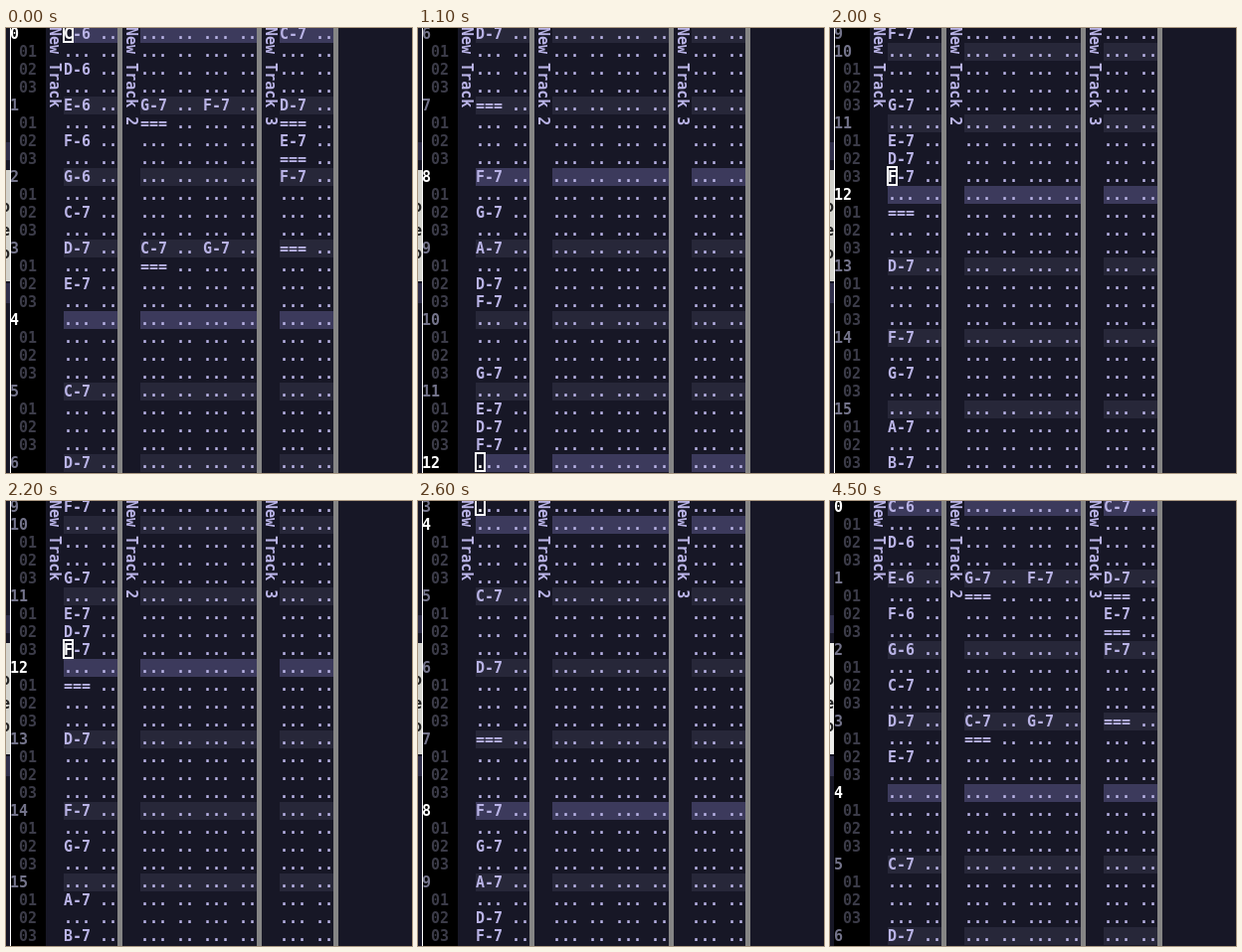
An HTML page with a canvas for the animation above (5000 ms loop, 408 by 448 pixels).

```html
<!DOCTYPE html>
<html lang="en">
<head>
<meta charset="utf-8">
<title>Pattern editor</title>
<style>
  html, body { margin: 0; width: 100%; height: 100%; overflow: hidden; background: #171726; }
  canvas { display: block; }
</style>
</head>
<body>
<canvas id="stage" width="408" height="448"></canvas>
<script>
const ctx = document.getElementById('stage').getContext('2d');
const LOOP = 5000, ROW = 18, CHAR = 9, VISIBLE = 25, LAST = 63;
const FONT = 'bold 15px "DejaVu Sans Mono", monospace';
const BG = '#171726', TEXT = '#b9b3e6';

// "row:note" lists, one per note column
const parse = list => Object.fromEntries(list.split(' ').map(item => item.split(':')));
const tracks = [
  { name: 'New Track', x: 40, columns: [parse(
    '0:C-6 2:D-6 4:E-6 6:F-6 8:G-6 10:C-7 12:D-7 14:E-7 20:C-7 24:D-7 28:=== ' +
    '32:F-7 34:G-7 36:A-7 38:D-7 39:F-7 43:G-7 45:E-7 46:D-7 47:F-7 49:=== ' +
    '52:D-7 56:F-7 58:G-7 61:A-7 63:B-7')] },
  { name: 'New Track 2', x: 117, columns: [
    parse('4:G-7 5:=== 12:C-7 13:==='), parse('4:F-7 12:G-7')] },
  { name: 'New Track 3', x: 257, columns: [
    parse('0:C-7 4:D-7 5:=== 6:E-7 7:=== 8:F-7 12:===')] }
];

// Page Down four times, then Page Up four times
const PAGE = 16;
const keys = [[500, PAGE], [800, PAGE], [1100, PAGE], [1300, PAGE],
              [2000, -PAGE], [2400, -PAGE], [2600, -PAGE], [3000, -PAGE]];

function viewAt(time) {
  let cursor = 0, top = 0;
  for (const [at, step] of keys) {
    if (time < at) break;
    cursor = Math.max(0, Math.min(LAST, cursor + step));
    top = Math.min(cursor, Math.max(top, cursor - VISIBLE + 1));
  }
  return { cursor, top, focused: time < 4500 };
}

function rect(x, y, w, h, color) {
  ctx.fillStyle = color;
  ctx.fillRect(x, y, w, h);
}

function write(text, x, y, color) {
  ctx.fillStyle = color;
  ctx.fillText(text, x, y);
}

function drawSidebar(focused) {
  rect(0, 0, 4, 448, BG);
  rect(0, 115, 4, 18, '#302f4b');
  rect(0, 143, 4, 112, focused ? '#d3d3cd' : '#ededeb');
  rect(0, 257, 4, 20, '#302f4b');
  ctx.save();
  ctx.beginPath();
  ctx.rect(0, 0, 4, 448);
  ctx.clip();
  write('o', -5, 185, '#222');
  write('e', -5, 209, '#222');
  write('o', -5, 232, '#222');
  ctx.restore();
  if (focused) rect(4, 0, 1, 448, '#fff');
}

function drawLineNumber(row, isFirst, y) {
  const beat = Math.floor(row / 4), sub = row % 4;
  if (sub && !isFirst) write('0' + sub, 13, y + 5, '#3b3b48');
  else write(beat, 4, y + 5, row % 16 ? '#73738a' : '#fff');
}

function drawTrack({ name, x, columns }, top) {
  const left = x + ROW, width = columns.length * 7 * CHAR - CHAR;
  for (let i = 0; i < VISIBLE; i++) {
    const row = top + i, y = 6 + i * ROW;
    if (row % 4 === 0) rect(left, y - 9, width, ROW, row % 16 ? '#272739' : '#3c3a5c');
    columns.forEach((notes, c) => {
      const cx = left + c * 7 * CHAR;
      write(notes[row] || '...', cx, y + 5, TEXT);
      write('..', cx + 4 * CHAR, y + 5, TEXT);
    });
  }
  rect(left + width, 0, 5, 448, '#858585');
  ctx.save();
  ctx.translate(x + 4, -1);
  ctx.rotate(Math.PI / 2);
  write(name, 0, 0, TEXT);
  ctx.restore();
}

function drawCursor(cursor, top) {
  const y = 6 + (cursor - top) * ROW;
  rect(57, y - 11, 11, 20, '#fff');
  rect(59, y - 9, 7, 16, BG);
  ctx.save();
  ctx.beginPath();
  ctx.rect(59, y - 9, 7, 16);
  ctx.clip();
  write((tracks[0].columns[0][cursor] || '.')[0], 58, y + 5, '#fff');
  ctx.restore();
}

function draw(time) {
  const { cursor, top, focused } = viewAt(time);
  ctx.font = FONT;
  rect(0, 0, 408, 448, BG);
  rect(4, 0, 36, 448, '#000');
  for (let i = 0; i < VISIBLE; i++) drawLineNumber(top + i, i === 0, 6 + i * ROW);
  tracks.forEach(track => drawTrack(track, top));
  drawSidebar(focused);
  if (focused) drawCursor(cursor, top);
}

function tick() {
  draw(performance.now() % LOOP);
  requestAnimationFrame(tick);
}
tick();
</script>
</body>
</html>
```
